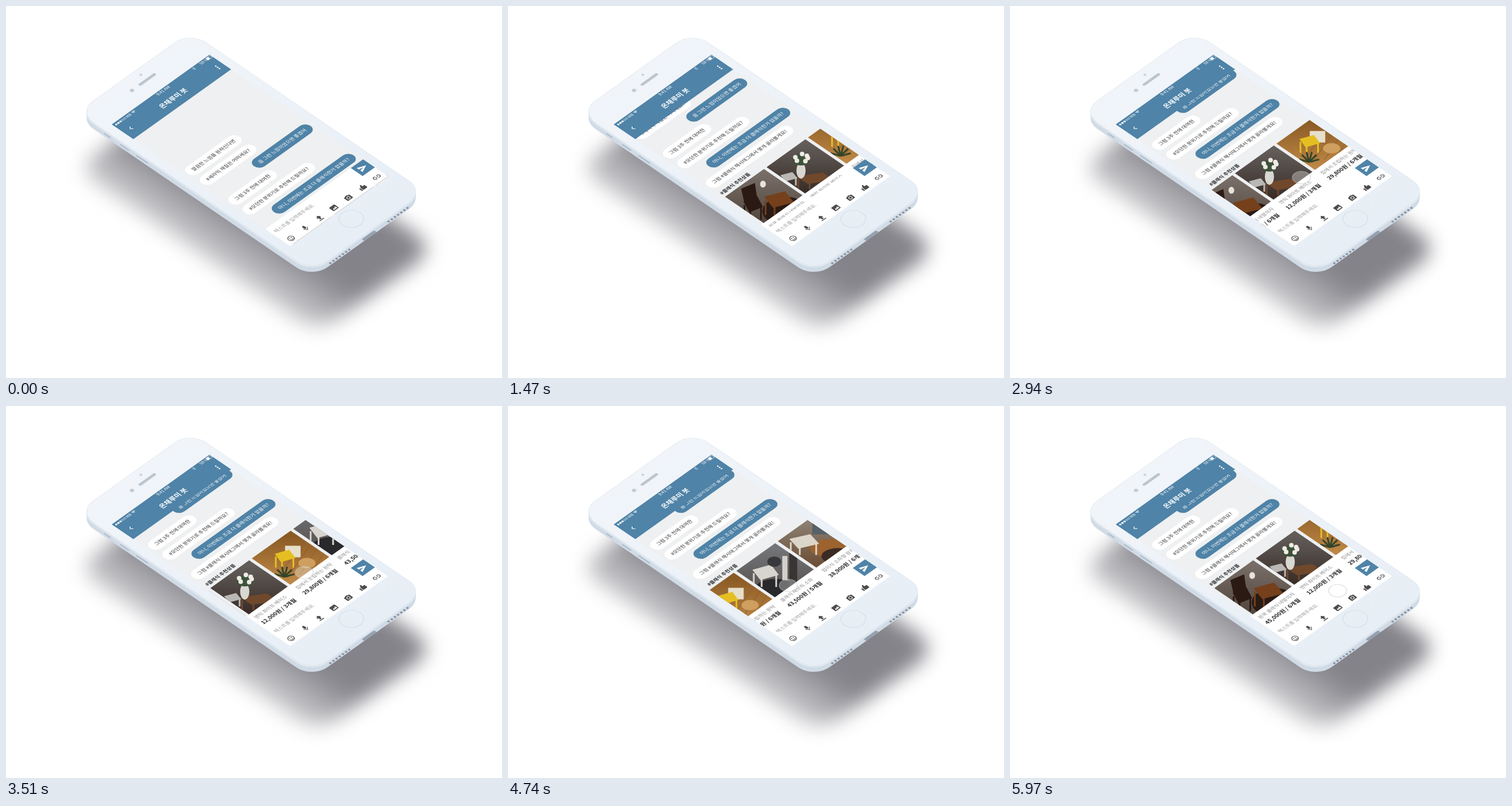
An HTML page with a canvas for the animation above (6000 ms loop, 864 by 648 pixels).

```html
<!DOCTYPE html>
<html lang="ko">
<head>
<meta charset="utf-8">
<style>
html, body { margin: 0; width: 100%; height: 100%; overflow: hidden; background: #fff; }
canvas { display: block; }
</style>
</head>
<body>
<canvas id="stage" width="864" height="648"></canvas>
<script>
const W = 864, H = 648, LOOP = 6000;
const BLUE = '#4f83a7', PAPER = '#eef0f1', ICON = '#4c4c4e';
const FONT = '"Noto Sans CJK KR", "Noto Sans CJK", "Noto Sans", sans-serif';
const CARD = { left: 12, step: 158, w: 148, top: 659, h: 144 };

const stage = document.getElementById('stage').getContext('2d');
let c = stage;

// Screen space: 375 x 667 units, laid flat in an axonometric view
function iso(dx = 0, dy = 0) {
  c.setTransform(0.4573, -0.3267, 0.4663, 0.3178, 183 + dx, 207 + dy);
}

// Undoes the view, so that shapes stand upright in stage pixels
function upright() {
  c.transform(1.0676, 1.0975, -1.5665, 1.5363, 0, 0);
}

// Eased progress from 0 to 1
function ramp(t, from, length) {
  const p = Math.min(1, Math.max(0, (t - from) / length));
  return 0.5 - 0.5 * Math.cos(Math.PI * p);
}

function rect(x, y, w, h, fill) {
  c.fillStyle = fill;
  c.fillRect(x, y, w, h);
}

function pill(x, y, w, h, r, fill) {
  c.beginPath();
  c.roundRect(x, y, w, h, r);
  c.fillStyle = fill;
  c.fill();
}

function oval(x, y, rx, ry, fill) {
  c.beginPath();
  c.ellipse(x, y, rx, ry, 0, 0, Math.PI * 2);
  c.fillStyle = fill;
  c.fill();
}

function poly(fill, ...p) {
  c.beginPath();
  for (let i = 0; i < p.length; i += 2) c.lineTo(p[i], p[i + 1]);
  c.fillStyle = fill;
  c.fill();
}

function line(color, width, ...p) {
  c.beginPath();
  for (let i = 0; i < p.length; i += 2) c.lineTo(p[i], p[i + 1]);
  c.strokeStyle = color;
  c.lineWidth = width;
  c.stroke();
}

function ring(x, y, r, color, width, from = 0, to = Math.PI * 2) {
  c.beginPath();
  c.arc(x, y, r, from, to);
  c.strokeStyle = color;
  c.lineWidth = width;
  c.stroke();
}

function fade(y0, y1, from, to) {
  const g = c.createLinearGradient(0, y0, 0, y1);
  g.addColorStop(0, from);
  g.addColorStop(1, to);
  return g;
}

function text(s, x, y, size, color, weight = 400, align = 'left') {
  c.font = `${weight} ${size}px ${FONT}`;
  c.textAlign = align;
  c.fillStyle = color;
  c.fillText(s, x, y + size * 0.36);
}

function at(x, y, draw) {
  c.save();
  c.translate(x, y);
  draw();
  c.restore();
}

// ---- Phone ----

function body(fill, grow = 0) {
  pill(-27 - grow, -98 - grow, 428 + 2 * grow, 876 + 2 * grow, 58 + grow, fill);
}

function drawShadow() {
  iso(8, 99);
  const shade = c.createLinearGradient(-27, 0, 150, 0);
  shade.addColorStop(0, 'rgba(128,127,134,.4)');
  shade.addColorStop(1, 'rgba(128,127,134,.97)');
  c.filter = 'blur(17px)';
  body(shade, 14);
  c.filter = 'none';
}

function drawPhone() {
  drawShadow();
  for (let d = 11; d > 0; d--) {
    iso(0, d);
    body(d > 3 ? '#d0dbe6' : '#dfe7ef');
  }
  iso();
  body(fade(-98, 778, '#f1f5fa', '#e7eef5'));
  c.lineWidth = 1.6;
  c.strokeStyle = '#dfe7ef';
  c.stroke();

  iso(0, 6);
  c.lineCap = 'round';
  for (let i = 0; i < 3; i++) line('#b0bdca', 4, -27, 2 + i * 60, -27, 22 + i * 70);
  for (let i = 0; i < 7; i++) {
    for (const x of [40, 262]) oval(x + i * 12, 780, 3.4, 3.4, '#84909d');
  }
  line('#95a1ae', 10, 168, 781, 206, 781);

  iso();
  line('#bcc5ce', 9, 164, -52, 218, -52);
  oval(133, -52, 6, 6, '#c3cbd4');
  oval(192, -77, 4, 4, '#c9d1d9');
  ring(190, 711, 33, '#d3dce6', 1.8);
  c.lineCap = 'butt';
}

// ---- Screen furniture ----

function drawHeader() {
  rect(2, 0, 373, 81, BLUE);
  for (let i = 0; i < 5; i++) {
    if (i < 3) oval(11 + i * 8, 9, 3.3, 3.3, '#fff');
    else ring(11 + i * 8, 9, 2.8, '#fff', 1);
  }
  text('MB', 49, 9, 12, '#fff');
  for (let r = 2; r < 10; r += 3) ring(77, 13, r, '#fff', 1.7, -2.35, -0.79);
  text('9:41 AM', 190, 8, 13, '#fff', 400, 'center');
  line('#b8cfdf', 1.1, 304, 5, 311, 11, 307.5, 14, 307.5, 2, 311, 5, 304, 11);
  text('58 %', 331, 8, 12.5, '#fff');
  c.strokeStyle = '#fff';
  c.lineWidth = 1;
  c.strokeRect(357, 3, 16, 10);
  rect(357, 4, 9, 8, '#fff');
  line('#fff', 2.2, 31, 41, 25, 47, 31, 53);
  text('온채루미 봇', 188, 48, 20.5, '#fff', 700, 'center');
  for (let i = -1; i < 2; i++) oval(355, 50 + i * 7, 2.4, 2.4, '#fff');
}

const icons = [
  function smile() {
    ring(0, 0, 9, ICON, 2);
    for (const x of [-3.2, 3.2]) oval(x, -2.6, 1.6, 1.6, ICON);
    ring(0, 0.5, 5, ICON, 1.8, 0.3, 2.84);
  },
  function mic() {
    pill(-3.5, -11, 7, 13, 3.5, ICON);
    ring(0, -1, 6.5, ICON, 1.8, 0, Math.PI);
    line(ICON, 2, 0, 6, 0, 10);
  },
  function upload() {
    poly(ICON, 0, -11, 8, -2, -8, -2);
    rect(-3, -3, 6, 8, ICON);
    rect(-8, 7, 16, 2.5, ICON);
  },
  function image() {
    pill(-10, -9, 20, 18, 2, ICON);
    poly('#fff', -7.5, 6, -3, 0, 0, 3, 4, -2.5, 8, 6);
  },
  function camera() {
    pill(-10, -7, 20, 16, 2, ICON);
    rect(-4, -9, 8, 3, ICON);
    ring(0, 1, 4.6, '#fff', 1.8);
  },
  function like() {
    rect(-11, -2, 4.5, 11, ICON);
    pill(-5, -3, 15, 12, 2, ICON);
    poly(ICON, -5, -2, 1, -11, 3.5, -9, 2.5, -2);
  },
  function link() {
    for (const x of [-6, 6]) ring(x, 0, 5, ICON, 2.2, x < 0 ? 0.8 : -2.3, x < 0 ? 5.5 : 2.3);
    rect(-5, -1.1, 10, 2.2, ICON);
  }
];

function drawInput() {
  rect(2, 574, 373, 93, '#fff');
  text('텍스트를 입력해주세요.', 12, 600, 15.2, '#97989a', 300);
  rect(328, 574, 47, 44, BLUE);
  at(351, 596, () => poly('#fff', -12, -11, 13, 0, -12, 11, -12, 3, 3, 0, -12, -3));
  icons.forEach((draw, i) => at(25 + 54.4 * i, 648, draw));
}

// ---- Conversation; a leading ">" marks the user's own lines ----

const chat = [
  '깔끔한 느낌을 원하신다면',
  '#세라믹 재질은 어떠세요?',
  '>음 그런 느낌이었으면 좋겠어',
  '그럼 3주 전에 대여한',
  '#모던한 분위기로 추천해 드릴까요?',
  '>아니, 이번에는 조금 더 클래식한거 없을까?',
  '그럼 #클래식 해시태그에서 몇개 골라볼게요!'
];

function drawBubble(entry, i) {
  const mine = entry[0] === '>', s = entry.replace('>', '');
  const y = 277 + 53.6 * i;
  c.font = `400 15.2px ${FONT}`;
  const w = c.measureText(s).width + 37;
  const x = mine ? 368 - w : 9;
  pill(x, y - 20, w, 40, 20, mine ? BLUE : '#fff');
  text(s, x + 18.5, y, 15.2, mine ? '#fff' : '#333');
}

// ---- Product cards: flat upright scenes about 135 px wide ----

function seat(x, y, w, h, color) {
  poly(color, x, y, x + w * 0.7, y - h * 0.3, x + w, y + h * 0.3, x + w * 0.3, y + h * 0.6);
  for (const k of [0.05, 0.35, 0.9]) line(color, 3, x + w * k, y + h * 0.2, x + w * k, y + h);
}

function leaves(x, y, r, n, color) {
  for (let i = 0; i < n; i++) {
    const a = -Math.PI * (i + 0.5) / n;
    line(color, 3, x, y, x + r * Math.cos(a), y + r * Math.sin(a));
  }
}

const scenes = {
  chair() {
    oval(105, 25, 40, 25, '#2a1b15');
    seat(68, 0, 52, 32, '#75401b');
    seat(32, 8, 34, 32, '#2b1a13');
    poly('#2b1a13', 28, -14, 52, -24, 56, 4, 34, 12);
    oval(66, -22, 5, 6, '#e7e2da');
  },
  vase() {
    seat(52, 16, 66, 22, '#70482b');
    seat(24, 14, 30, 18, '#b9b8b5');
    oval(60, 6, 8, 14, '#d9d7d2');
    oval(60, -13, 15, 10, '#3d5239');
    for (let i = 0; i < 6; i++) oval(61 + 11 * Math.cos(i * 2.4), -16 + 7 * Math.sin(i * 2.4), 4, 4, '#eeeae5');
  },
  yellow() {
    for (let i = 0; i < 5; i++) line('#8f602b', 1, 40 + i * 22, 40 - i * 6, 90 + i * 16, -30);
    oval(96, 8, 15, 9, '#cf9f60');
    rect(58, -22, 27, 20, '#e6dfcb');
    seat(40, -8, 36, 24, '#e5bf22');
    leaves(57, 32, 18, 6, '#34442a');
  },
  sofa() {
    oval(68, 32, 36, 18, '#29282b');
    rect(80, -26, 9, 42, '#d3d0cb');
    rect(92, -34, 14, 60, '#3a3535');
    seat(28, -2, 46, 30, '#d8d5d0');
    oval(66, -16, 12, 9, '#37383c');
  },
  fold() {
    rect(60, -48, 50, 36, '#566168');
    oval(94, 12, 38, 16, '#9c632f');
    oval(104, 26, 28, 14, '#3a2b24');
    seat(20, -4, 52, 28, '#dcd5ca');
  }
};

const cards = [
  ['원목 클래식 네발의자', '45,000원 / 6개월', 'chair', '#776d66', '#544840'],
  ['앤틱 화이트 베이스', '12,000원 / 3개월', 'vase', '#625d5a', '#3a2e29'],
  ['집에서 조립하는 원탁', '29,800원 / 6개월', 'yellow', '#8a5a25', '#bd8745'],
  ['클래식 패브릭 소파', '43,500원 / 5개월', 'sofa', '#737478', '#55504d'],
  ['접이식 소파형 왕자', '38,900원 / 6개월', 'fold', '#8d8478', '#6d4f37']
];

function drawCards(slide) {
  text('#클래식 추천상품', 12, 643, 15, '#2b2b2d', 700);
  rect(2, CARD.top + CARD.h, 373, 80, '#fff');
  cards.forEach(([name, price, scene, wall, floor], i) => {
    at(CARD.left + i * CARD.step - slide, CARD.top, () => {
      text(name, 1, 166, 15.2, '#8a8b8d', 300);
      text(price, 0, 193, 17, '#242426', 700);
      c.beginPath();
      c.rect(0, 0, CARD.w, CARD.h);
      c.clip();
      upright();
      rect(0, -50, 136, 98, fade(-40, 40, wall, floor));
      scenes[scene]();
    });
  });
}

// ---- Motion ----

const swipes = [
  { from: 2460, length: 960, by: 158 },
  { from: 3570, length: 780, by: 103 },
  { from: 4470, length: 415, by: 166 },
  { from: 5000, length: 600, by: -427 }
];

const scrollAt = t => 57 * ramp(t, 330, 360) + 243 * ramp(t, 1110, 510);
const slideAt = t => swipes.reduce((sum, s) => sum + s.by * ramp(t, s.from, s.length), 0);

// The finger follows each drag, then returns for the next one
function touchAt(t) {
  const enter = ramp(t, 1890, 425);
  let x = 307 - 25 * enter;
  swipes.forEach((s, i) => {
    const next = swipes[i + 1], end = s.from + s.length;
    x -= Math.max(s.by, -118) * ramp(t, s.from, s.length);
    if (next && next.by > 0) x += s.by * ramp(t, end, next.from - end);
  });
  const y = 674 - 177 * enter - 56 * ramp(t, 5000, 600) + 161 * ramp(t, 5690, 280);
  return [x, y];
}

function drawTouch(t) {
  const [x, y] = touchAt(t);
  c.globalAlpha = ramp(t, 1890, 150);
  oval(x, y, 24, 24, 'rgba(255,255,255,.32)');
  ring(x, y, 24, 'rgba(190,190,192,.7)', 1.6);
  c.globalAlpha = 1;
}

const phone = document.createElement('canvas');
phone.width = W;
phone.height = H;
c = phone.getContext('2d');
drawPhone();
c = stage;

function draw(t) {
  c.setTransform(1, 0, 0, 1, 0, 0);
  rect(0, 0, W, H, '#fff');
  c.drawImage(phone, 0, 0);
  iso();
  c.save();
  c.beginPath();
  c.rect(2, 0, 373, 667);
  c.clip();
  rect(2, 0, 373, 667, PAPER);
  at(0, -scrollAt(t), () => {
    chat.forEach(drawBubble);
    drawCards(slideAt(t));
  });
  drawHeader();
  drawInput();
  c.restore();
  drawTouch(t);
}

const start = performance.now();
function tick() {
  draw((performance.now() - start) % LOOP);
  requestAnimationFrame(tick);
}
tick();
</script>
</body>
</html>
```
